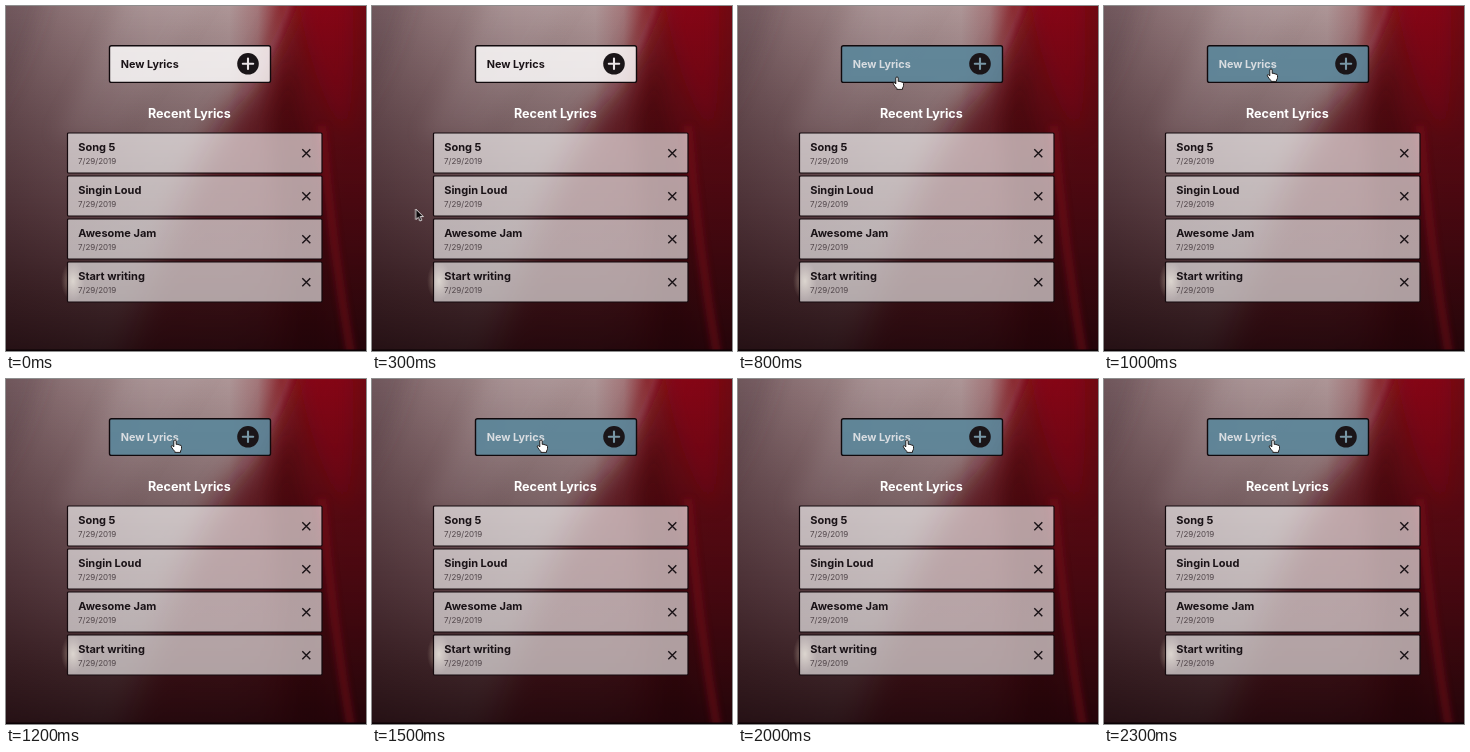
Animation, 360 px wide and 345 px high, one loop 2.4 s. Source, as an HTML page:

```html
<!DOCTYPE html>
<html lang="en">
<head>
<meta charset="utf-8">
<title>Lyrics</title>
<style>
html, body { margin: 0; width: 100%; height: 100%; overflow: hidden; background: #1c060b; }
svg { display: block; width: 360px; height: 345px; }
text { font-family: Inter, "Liberation Sans", sans-serif; font-weight: 700; }
.title { font-size: 11px; fill: #1a1317; }
.date { font-size: 8px; font-weight: 400; fill: #51464a; }
.head { font-size: 12.6px; fill: #fff; text-anchor: middle; }
.card { fill: #fff; fill-opacity: .61; stroke: #150a0e; stroke-width: 1.2; }
.cross { fill: none; stroke: #1a1317; stroke-width: 1.4; }

/* 24 steps of 100 ms */
.box, .label, .plus, .arrow, .hand, .cursor { animation: 2.4s step-end infinite; }
.box { fill: #fff; fill-opacity: .82; stroke: #10090c; stroke-width: 1.4; animation-name: box; }
.label { font-size: 10.8px; fill: #1a1317; animation-name: label; }
.plus { fill: none; stroke: #eae4e7; stroke-width: 2.1; stroke-linecap: round; animation-name: plus; }
.arrow { animation-name: arrow; }
.hand { animation-name: hand; }
.cursor { animation-name: move; }
@keyframes box { 33.33%, 100% { fill: #5b879b; fill-opacity: .9; } }
@keyframes label { 33.33%, 100% { fill: #d9dde1; } }
@keyframes plus { 33.33%, 100% { stroke: #7896a5; } }
@keyframes arrow { 0% { opacity: 0; } 8.33% { opacity: 1; } 33.33%, 100% { opacity: 0; } }
@keyframes hand { 0% { opacity: 0; } 33.33%, 100% { opacity: 1; } }
@keyframes move {
  0% { transform: translate(-30px, 290px); }
  8.33% { transform: translate(4px, 250px); }
  12.5% { transform: translate(43.7px, 203px); }
  16.66% { transform: translate(85px, 150px); }
  20.83% { transform: translate(116px, 112px); }
  25% { transform: translate(135.7px, 90px); }
  29.16% { transform: translate(150px, 78.5px); }
  33.33% { transform: translate(159px, 71px); }
  37.5% { transform: translate(164px, 66px); }
  41.66% { transform: translate(167px, 63px); }
  45.83% { transform: translate(168.5px, 61.5px); }
  50%, 100% { transform: translate(169px, 61px); }
}
</style>
</head>
<body>
<svg viewBox="0 0 360 345" xmlns="http://www.w3.org/2000/svg">
  <defs>
    <linearGradient id="base">
      <stop offset="0" stop-color="#785f63"/>
      <stop offset=".17" stop-color="#8c7275"/>
      <stop offset=".4" stop-color="#a28c8d"/>
      <stop offset=".62" stop-color="#ae9697"/>
      <stop offset=".7" stop-color="#a4777a"/>
      <stop offset=".77" stop-color="#8e2a32"/>
      <stop offset=".84" stop-color="#820c18"/>
      <stop offset="1" stop-color="#800612"/>
    </linearGradient>
    <linearGradient id="shade" x2="0" y2="1">
      <stop offset="0" stop-color="#22060c" stop-opacity="0"/>
      <stop offset=".3" stop-color="#22060c" stop-opacity=".27"/>
      <stop offset=".6" stop-color="#22060c" stop-opacity=".53"/>
      <stop offset=".85" stop-color="#1e060a" stop-opacity=".76"/>
      <stop offset="1" stop-color="#180408" stop-opacity=".86"/>
    </linearGradient>
    <radialGradient id="glow">
      <stop offset="0" stop-color="#ddd0b4" stop-opacity=".65"/>
      <stop offset="1" stop-color="#c0a898" stop-opacity="0"/>
    </radialGradient>
    <filter id="wide" x="-50%" y="-30%" width="200%" height="160%"><feGaussianBlur stdDeviation="15"/></filter>
    <filter id="soft" x="-50%" y="-20%" width="200%" height="140%"><feGaussianBlur stdDeviation="9"/></filter>
    <filter id="fine" x="-50%" y="-20%" width="200%" height="140%"><feGaussianBlur stdDeviation="3"/></filter>
    <g id="card">
      <rect class="card" x="61.5" y="1" width="254.5" height="40" rx="1"/>
      <path class="cross" d="M296.3 17.2l8 8m0-8l-8 8"/>
    </g>
  </defs>

  <rect width="360" height="345" fill="url(#base)"/>
  <path d="M305-40Q275 60 222 110Q165 190 105 400H420V-40Z" fill="#6c0a14" opacity=".78" filter="url(#wide)"/>
  <g filter="url(#soft)">
    <path d="M120-20H205Q170 40 110 130H50Q95 50 120-20Z" fill="#b9a6a8" opacity=".28"/>
    <path d="M-20 120Q20 60 40-20H-20Z" fill="#614a4f" opacity=".3"/>
    <path d="M285 50Q290 100 305 140T318 345H285Q275 190 262 120Z" fill="#35000a" opacity=".4"/>
    <path d="M290-20H345Q352 60 340 130Q305 80 290-20Z" fill="#a00a1a" opacity=".45"/>
  </g>
  <path d="M284-10Q270 45 236 92" fill="none" stroke="#b78187" stroke-width="6" opacity=".25" filter="url(#fine)"/>
  <rect width="360" height="345" fill="url(#shade)"/>
  <path d="M316 120Q326 240 346 355" fill="none" stroke="#86101a" stroke-width="8" opacity=".5" filter="url(#fine)"/>
  <ellipse cx="67" cy="275" rx="12" ry="20" fill="url(#glow)"/>
  <rect y="343.5" width="360" height="1.5" fill="#0b0205"/>

  <rect class="box" x="103.5" y="39.7" width="161" height="36.7" rx="2"/>
  <text class="label" x="114.8" y="62">New Lyrics</text>
  <circle cx="242" cy="57.8" r="10.8" fill="#1a1518"/>
  <path class="plus" d="M236.8 57.8h10.4M242 52.6v10.4"/>

  <text class="head" x="183.4" y="112">Recent Lyrics</text>

  <g transform="translate(0 126)">
    <use href="#card"/>
    <text class="title" x="72.2" y="19">Song 5</text><text class="date" x="72" y="32">7/29/2019</text>
  </g>
  <g transform="translate(0 169)">
    <use href="#card"/>
    <text class="title" x="72.2" y="19">Singin Loud</text><text class="date" x="72" y="32">7/29/2019</text>
  </g>
  <g transform="translate(0 212)">
    <use href="#card"/>
    <text class="title" x="72.2" y="19">Awesome Jam</text><text class="date" x="72" y="32">7/29/2019</text>
  </g>
  <g transform="translate(0 255)">
    <use href="#card"/>
    <text class="title" x="72.2" y="19">Start writing</text><text class="date" x="72" y="32">7/29/2019</text>
  </g>

  <g class="cursor" stroke-linejoin="round">
    <path class="arrow" d="M0 0V10.6L2.5 8.3L4.1 12L6 11.2L4.4 7.6H7.7Z" fill="#0c080a" stroke="#eee" stroke-width=".9"/>
    <path class="hand" d="M-1.2 1Q-1.2 0 0 0T1.2 1V4.4Q2.2 3.8 3 4.7Q4.1 4.2 4.8 5.2Q6.4 4.9 6.5 6.4V8.4Q6.5 10 5.5 11V12.4H-.2V11.4Q-1.8 9.8-3.6 7Q-4.2 5.9-3.2 5.6Q-2.3 5.4-1.2 6.9Z" fill="#fff" stroke="#15100f" stroke-width=".9"/>
  </g>
</svg>
</body>
</html>
```
